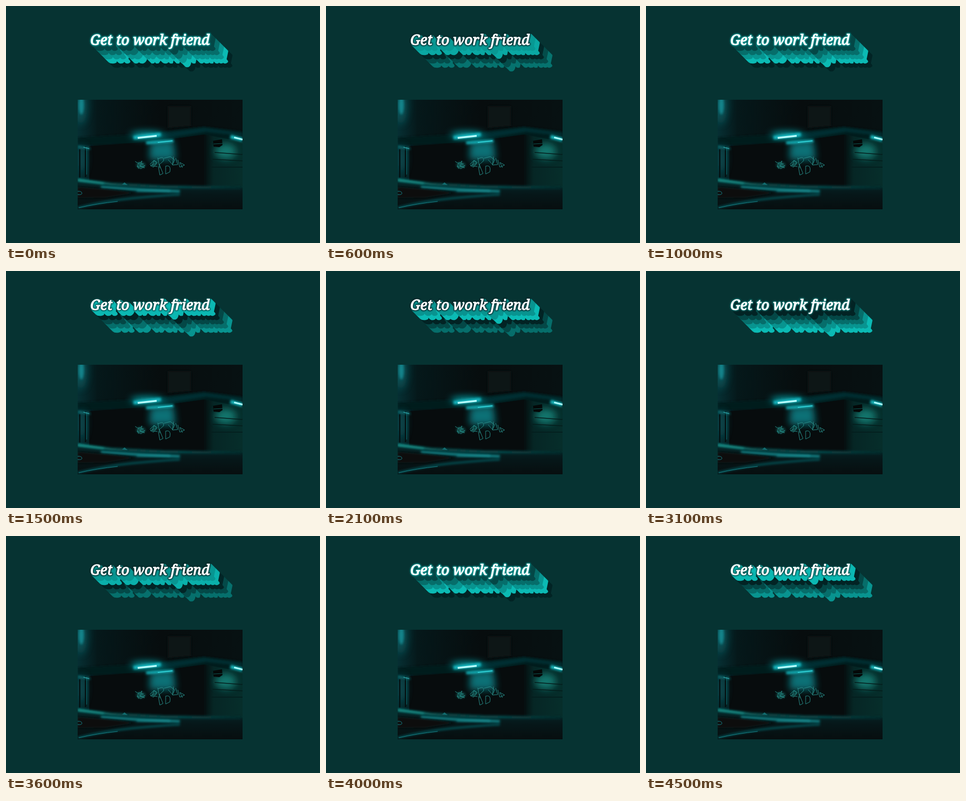
These frames come from a looping animation (596 by 450 pixels, 4.6 s). An HTML page:

```html
<!DOCTYPE html>
<html lang="en">
<head>
<meta charset="utf-8">
<title>Get to work friend</title>
<style>
  html, body { margin: 0; width: 100%; height: 100%; overflow: hidden; background: #063332; }
  svg { display: block; width: 596px; height: 450px; }
  text { font: italic 400 26.7px "Noto Serif", "DejaVu Serif", serif; stroke-linejoin: round; }
  .face { fill: #fff; stroke: #fff; stroke-width: 1.2px; }
  .band { stroke-width: 4.6px; }
  .glow { stroke-width: 4px; }
</style>
</head>
<body>
<svg viewBox="0 0 596 450">
  <defs>
    <filter id="edge" x="-10%" y="-30%" width="120%" height="160%"><feGaussianBlur stdDeviation="1"/></filter>
    <filter id="soft" filterUnits="userSpaceOnUse" x="100" y="150" width="380" height="260"><feGaussianBlur stdDeviation="2"/></filter>
    <filter id="haze" filterUnits="userSpaceOnUse" x="100" y="150" width="380" height="260"><feGaussianBlur stdDeviation="7"/></filter>
    <clipPath id="frame"><rect x="136" y="178" width="313" height="208"/></clipPath>
    <linearGradient id="sky" x2="1" y2="0">
      <stop stop-color="#063034"/><stop offset=".12" stop-color="#05181a"/>
      <stop offset=".5" stop-color="#070d0e"/><stop offset="1" stop-color="#071112"/>
    </linearGradient>
    <linearGradient id="wall" x2="1" y2="0">
      <stop stop-color="#050f0f"/><stop offset=".25" stop-color="#062625"/><stop offset="1" stop-color="#062e2b"/>
    </linearGradient>
    <linearGradient id="road" x2="0" y2="1">
      <stop stop-color="#05282a"/><stop offset=".5" stop-color="#061719"/><stop offset="1" stop-color="#070e0f"/>
    </linearGradient>
    <linearGradient id="curb" gradientUnits="userSpaceOnUse" x1="136" y1="0" x2="449" y2="0">
      <stop stop-color="#138f88"/><stop offset=".3" stop-color="#0a5a59"/>
      <stop offset=".6" stop-color="#0a5557"/><stop offset="1" stop-color="#062b2b"/>
    </linearGradient>
  </defs>

  <g clip-path="url(#frame)">
    <rect x="136" y="178" width="313" height="208" fill="url(#sky)"/>
    <ellipse cx="142" cy="190" rx="12" ry="34" fill="#0a5f64" filter="url(#haze)" opacity=".7"/>
    <ellipse cx="143" cy="188" rx="5" ry="18" fill="#15929a" filter="url(#soft)" opacity=".8"/>
    <path d="M307 190h44v38l-44 4z" fill="#071716" filter="url(#soft)"/>

    <!-- canopy and walls -->
    <path d="M136 250L250 243 376 229 449 238V262L376 246 270 262 136 264Z" fill="#051a1c" filter="url(#soft)"/>
    <path d="M280 243L376 231 449 241V247L380 239 300 252Z" fill="#062d30" filter="url(#soft)"/>
    <path d="M158 266L272 258 378 244V348L158 337Z" fill="#070c0d"/>
    <path d="M376 244L449 258V346H376Z" fill="url(#wall)"/>
    <ellipse cx="417" cy="276" rx="20" ry="15" fill="#13897f" filter="url(#haze)" opacity=".8"/>
    <path d="M396 278L449 282M392 291L449 294M390 306H449" stroke="#041d1c" stroke-width="1.3"/>
    <path d="M378 246V346" stroke="#061011" stroke-width="4"/>
    <path d="M393 256l17-3 1 11-6 4-11-1z" fill="#040808"/>
    <path d="M394 262l17-1" stroke="#0d5450"/>

    <!-- lamps -->
    <ellipse cx="268" cy="245" rx="32" ry="6" fill="#0eaab0" filter="url(#haze)"/>
    <path d="M274 259L318 256 322 292H272Z" fill="#0b7c82" filter="url(#haze)" opacity=".9"/>
    <path d="M242 250L294 244" stroke="#14b9c3" stroke-width="7" filter="url(#soft)"/>
    <path d="M250 250.5L286 246.5" stroke="#b4ffff" stroke-width="3.4"/>
    <path d="M266 260L318 256" stroke="#17b6bd" stroke-width="5" filter="url(#soft)"/>
    <path d="M288 259L316 256" stroke="#38dbe0" stroke-width="1.3"/>
    <path d="M426 248L449 254" stroke="#15bdc3" stroke-width="7" filter="url(#soft)"/>
    <path d="M433 249.5L449 253.5" stroke="#a9ffff" stroke-width="3"/>

    <!-- street pole -->
    <ellipse cx="144" cy="290" rx="8" ry="28" fill="#075055" filter="url(#haze)" opacity=".8"/>
    <path d="M151 266V325M140 272V326" stroke="#041011" stroke-width="2.5"/>
    <path d="M153 268V320" stroke="#0c6a6c" stroke-width="1"/>
    <path d="M136 267L160 271" stroke="#15858a" stroke-width="2.5" filter="url(#soft)"/>
    <path d="M147 268L158 271" stroke="#30b0b3" stroke-width="1.2"/>

    <!-- wall scribble -->
    <g fill="none" stroke="#2b9590" stroke-width=".9">
      <path d="M245 295l8 5 5-6-3 11 9-2-8 6-7-4 3-8 9 3-8 2 10 5-14-3 3 5M273 301l8-8 6 4-7 9-6-3 12-4-5-6-3 10 9 2"/>
      <path d="M288 288l4 20M289 290q12-6 10 4l-8 7 7 17-6 3-3-17M300 289l12-3 8 6-4 9-8-9M303 304q11-3 8 11l-8 4zM318 286l-2 16 10-1-4-12M326 292l4 14 9-4-9-5 5 10"/>
    </g>
    <ellipse cx="256" cy="302" rx="9" ry="6" fill="#14706a" filter="url(#soft)" opacity=".55"/>
    <ellipse cx="282" cy="299" rx="7" ry="4" fill="#14706a" filter="url(#soft)" opacity=".45"/>

    <!-- street -->
    <path d="M136 329L230 341 449 345V386H136Z" fill="url(#road)"/>
    <path d="M136 330L200 338 300 343 449 345" fill="none" stroke="url(#curb)" stroke-width="4" filter="url(#soft)"/>
    <path d="M136 331L186 337" stroke="#1aa79d" stroke-width="2" filter="url(#soft)"/>
    <path d="M180 344L262 349 330 352" fill="none" stroke="#108488" stroke-width="5" filter="url(#soft)"/>
    <path d="M248 351H312" stroke="#1b9da2" stroke-width="2" filter="url(#soft)"/>
    <path d="M136 343Q215 349 246 355L190 364 136 365Z" fill="#07100f" filter="url(#soft)"/>
    <path d="M136 383Q190 370 240 365T330 358" fill="none" stroke="#0c6b70" stroke-width="2.5" filter="url(#soft)"/>
    <path d="M138 383Q172 375 212 371" fill="none" stroke="#178187" stroke-width="1"/>
    <path d="M136 352q7-1 8 3t-8 3" fill="none" stroke="#158087"/>
    <path d="M220 339l5-4 6 5z" fill="#126d70"/>
  </g>

  <g id="title"></g>
</svg>

<script>
  const LOOP = 4600, TICK = 100, BANDS = 5, DEPTH = 8, SPEED = 0.65;
  const shades = [[3, 36, 37], [5, 72, 71], [7, 110, 107], [9, 148, 144], [12, 186, 180]];
  // Each run starts at a tick, stops at another, and has a starting wave position.
  const runs = [
    { from: 0, to: 2, wave: 4 },
    { from: 4, to: 29, wave: 3 },
    { from: 31, to: 38, wave: 5 },
    { from: 40, to: 45, wave: 4.1 }
  ];

  const title = document.getElementById("title");
  const bands = [];

  function add(parent, name, attributes) {
    const node = document.createElementNS("http://www.w3.org/2000/svg", name);
    for (const key in attributes) node.setAttribute(key, attributes[key]);
    return parent.appendChild(node);
  }

  function addText(parent, offset) {
    add(parent, "text", { x: 160 + offset, y: 73.5 + offset }).textContent = "Get to work friend";
  }

  for (let band = BANDS - 1; band >= 0; band--) {
    bands[band] = add(title, "g", { class: "band", "aria-hidden": true });
    const nearest = band * DEPTH + 2;
    for (let offset = (band + 1) * DEPTH + 1; offset >= nearest; offset--) addText(bands[band], offset);
  }
  const glow = add(title, "g", { class: "glow", filter: "url(#edge)", "aria-hidden": true });
  addText(glow, 0);
  addText(add(title, "g", { class: "face" }), 0);

  const wrap = n => ((n % BANDS) + BANDS) % BANDS;
  const smooth = x => x * x * (3 - 2 * x);

  function waveAt(tick) {
    const run = runs.filter(r => r.from <= tick).pop();
    return run.wave - SPEED * (Math.min(tick, run.to) - run.from);
  }

  function paint(node, place, wave) {
    const base = Math.floor(wave);
    const mix = smooth(smooth(wave - base));
    const a = shades[wrap(place - base)], b = shades[wrap(place - base - 1)];
    const color = `rgb(${a.map((v, k) => Math.round(v + (b[k] - v) * mix))})`;
    node.setAttribute("fill", color);
    node.setAttribute("stroke", color);
  }

  function loop() {
    const wave = waveAt(Math.floor((performance.now() % LOOP) / TICK));
    bands.forEach((node, i) => paint(node, i, wave));
    paint(glow, 2, wave);
    requestAnimationFrame(loop);
  }
  loop();
</script>
</body>
</html>
```
